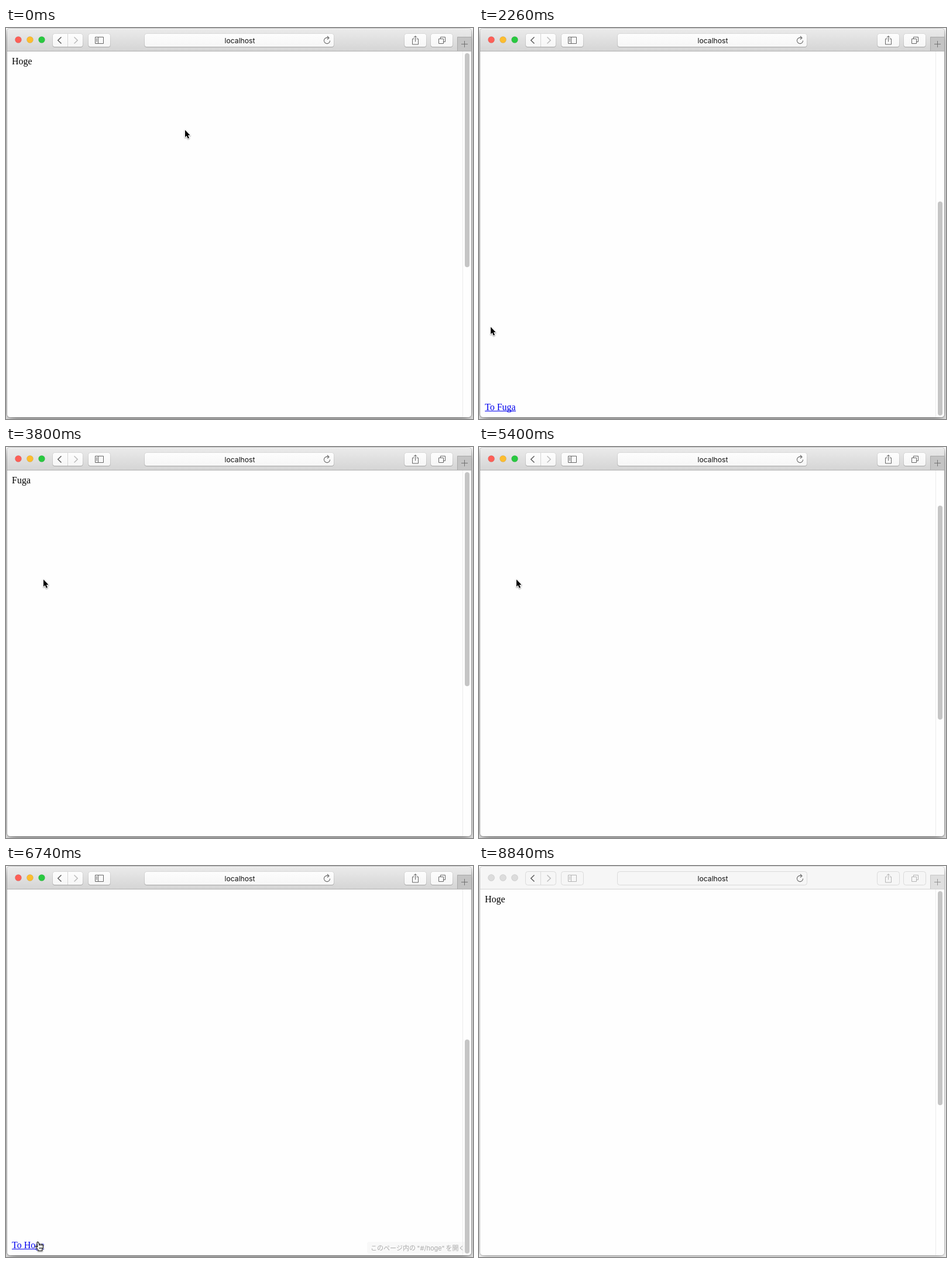
Recreate the animation shown at these times as an HTML page with a canvas. Size 798x667 px, loop 8.89 s.

```html
<!DOCTYPE html>
<html lang="ja">
<head>
<meta charset="utf-8">
<title>localhost</title>
<style>
html, body { margin: 0; width: 100%; height: 100%; overflow: hidden; background: #fff; }
canvas { display: block; width: 798px; height: 667px; }
</style>
</head>
<body>
<canvas id="stage" width="798" height="667"></canvas>
<script>
const ctx = document.getElementById('stage').getContext('2d');
const LOOP = 8890, BLUR = 8840, FADE = 160;
const VIEW = 624, THUMB = 365, TRAVEL = 253;
const MAX_SCROLL = VIEW * TRAVEL / THUMB;
const UI = 'Inter, Roboto, sans-serif';
const CJK = '"Noto Sans CJK JP", "Noto Sans CJK", sans-serif';
const SERIF = '16px "Liberation Serif", Times, serif';

// Each glide: start time, end time, destination
const scrolls = {
  Hoge: [[860, 1130, 43], [1310, 1660, 210], [1810, 1890, TRAVEL]],
  Fuga: [[4720, 4810, 12], [5170, 5220, 33], [5400, 5400, 57], [5670, 6000, TRAVEL]]
};
const moves = [
  [2100, 2260, 20, 510],
  [2320, 2560, 40, 643],
  [3400, 3800, 64, 226],
  [6080, 6550, 55, 641],
  [7440, 7780, 457, 625],
  [7810, 7870, 743, 598],
  [8080, 8420, 771, 669]
];
const hovers = [
  { hash: '#/fuga', from: 2560, click: 2990, show: 2680, hide: 3400 },
  { hash: '#/hoge', from: 6550, click: 7050, show: 6690, hide: 7440 }
];

const clamp = v => Math.min(1, Math.max(0, v));
const ease = p => p * p * (3 - 2 * p);

function glide(list, t, start) {
  let pos = start;
  for (const [t0, t1, ...to] of list) {
    if (t < t0) break;
    const p = t1 > t0 ? ease(clamp((t - t0) / (t1 - t0))) : 1;
    pos = pos.map((v, i) => v + (to[i] - v) * p);
  }
  return pos.map(Math.round);
}

function rounded(x, y, w, h, r, fill, stroke) {
  ctx.beginPath();
  ctx.roundRect(x, y, w, h, r);
  paint(fill, stroke);
}

function circle(x, y, r, fill, stroke) {
  ctx.beginPath();
  ctx.arc(x, y, r, 0, 7);
  paint(fill, stroke);
}

function paint(fill, stroke) {
  if (fill) {
    ctx.fillStyle = fill;
    ctx.fill();
  }
  if (stroke) {
    ctx.strokeStyle = stroke;
    ctx.lineWidth = 1;
    ctx.stroke();
  }
}

function rect(color, x, y, w, h) {
  ctx.fillStyle = color;
  ctx.fillRect(x, y, w, h);
}

function icon(color, path, width = 1) {
  ctx.strokeStyle = color;
  ctx.lineWidth = width;
  ctx.stroke(new Path2D(path));
}

function text(str, x, y, font, color, align = 'left') {
  ctx.font = font;
  ctx.fillStyle = color;
  ctx.textAlign = align;
  ctx.fillText(str, x, y);
}

function gradient(y0, y1, top, bottom) {
  const g = ctx.createLinearGradient(0, y0, 0, y1);
  g.addColorStop(0, top);
  g.addColorStop(1, bottom);
  return g;
}

function button(x, w, active) {
  if (!active) return rounded(x - 0.5, 9.5, w + 1, 23, 4, null, '#dadada');
  rounded(x - 0.5, 9.5, w + 1, 23.5, 4, gradient(9, 33, 'rgba(0,0,0,.1)', 'rgba(0,0,0,.24)'));
  rounded(x, 10, w, 22, 3.5, gradient(10, 32, '#fdfdfd', '#f6f6f6'));
}

function windowFrame(active) {
  rect('#fff', 0, 0, 798, 667);
  ctx.save();
  ctx.shadowColor = `rgba(0,0,0,${active ? 0.52 : 0.32})`;
  ctx.shadowBlur = active ? 18 : 12;
  ctx.shadowOffsetY = active ? 7 : 4;
  rounded(2, 1, 793, 663, 5, '#fefefe');
  ctx.restore();
  rounded(1.5, 0.5, 794, 664, 5, null, `rgba(0,0,0,${active ? 0.18 : 0.12})`);
}

function toolbar(active) {
  const ink = active ? '#666' : '#b4b4b4';
  rounded(2, 1, 793, 39, [5, 5, 0, 0], active ? gradient(1, 39, '#ebebeb', '#d5d5d5') : '#f6f6f6');
  rect(active ? '#f6f6f6' : '#fbfbfb', 6, 1, 785, 1);
  rect(active ? '#b0b0b0' : '#d3d3d3', 2, 39, 793, 1);

  ['#fd5f57', '#fdbd2f', '#29c940'].forEach((color, i) =>
    circle(21 + 20 * i, 20, 5.5, active ? color : '#dcdcdc', 'rgba(0,0,0,.09)'));

  for (const [x, w] of [[80, 51], [141, 37], [237, 323], [681, 37], [726, 37]]) button(x, w, active);
  rect(active ? '#d4d4d4' : '#dadada', 105, 10, 1, 22);

  icon('#5e5e5e', 'M94.5 15.5L88.8 21L94.5 26.5', 1.5);
  icon('#bababa', 'M116.5 15.5L122.2 21L116.5 26.5', 1.5);
  icon(ink, 'M152.5 15.5h14v11h-14zM157.5 15v12M154 18.5h2M154 20.5h2M154 22.5h2');
  icon('#666', 'M553.6 21.5A5.1 5.1 0 1 1 550.5 16.8M549 14L552 17L549 19.5', 1.1);
  icon(ink, 'M697.5 18.5h-3v9.5h10v-9.5h-3M699.5 14v9.5M696.5 16.5l3 -3l3 3');
  icon(ink, 'M739.5 18.5h8v8h-8zM742.5 18v-2.5h8v8h-2.5');
  text('localhost', 399.5, 26, '12.2px ' + UI, '#111', 'center');

  rect(active ? '#c4c4c4' : '#dfdfdf', 771, 15, 24, 24);
  icon(active ? '#a9a9a9' : '#c8c8c8', 'M771.5 39V15.5H795');
  icon(active ? '#737373' : '#959595', 'M778 27.5h11M783.5 22v11');
}

function page(name, other, scroll) {
  const label = 'To ' + other, y = 652 + MAX_SCROLL - scroll;
  ctx.save();
  ctx.beginPath();
  ctx.rect(2, 40, 778, VIEW);
  ctx.clip();
  text(name, 10, 62 - scroll, SERIF, '#000');
  text(label, 10, y, SERIF, '#0000ee');
  rect('#0000ee', 10, y + 1, Math.round(ctx.measureText(label).width), 1);
  ctx.restore();
}

function tooltip({ hash, show, hide }, t) {
  ctx.save();
  ctx.globalAlpha = clamp((t - show) / FADE) * clamp(1 - (t - hide) / FADE);
  const font = '11px ' + CJK, latin = '11px ' + UI;
  ctx.font = latin;
  const quoted = `"${hash}"`;
  const x = 734 - Math.round(ctx.measureText(quoted).width / 2) - 93;
  rounded(x, 641, 792 - x, 20, 4, '#eaeaea');
  text('このページ内の', x + 6, 655.5, font, '#000');
  text(quoted, (x + 835) / 2, 655.5, latin, '#000', 'center');
  text('を開く', 751.5, 655.5, font, '#000');
  ctx.restore();
}

function scrollbar(offset) {
  rect('#ebebeb', 780, 40, 1, VIEW);
  rounded(784, 43 + offset, 8, THUMB, 4, '#c5c5c5');
}

const arrow = new Path2D('M0 0V12.2L2.7 9.7L4.8 14.4L7 13.5L4.9 8.9H8.6Z');
const hand = new Path2D('M-2 1.2Q-1 -.4 .4 .8L1.8 5Q2.6 3.4 4 4.4Q5.2 3.4 6.4 4.9Q7.6 4.2 8.3 5.8' +
  'L8.4 9.8L6.8 13V15.5H-.2V13.5L-4 9Q-4.8 7.4 -3.3 7.2L-1.2 9Z');

function pointer([x, y], overLink) {
  const shape = overLink ? hand : arrow;
  ctx.save();
  ctx.translate(x, y);
  ctx.lineJoin = 'round';
  ctx.shadowColor = 'rgba(0,0,0,.4)';
  ctx.shadowBlur = 2;
  ctx.shadowOffsetY = 1;
  ctx.strokeStyle = '#fff';
  ctx.lineWidth = 2;
  ctx.stroke(shape);
  ctx.shadowColor = 'transparent';
  ctx.fillStyle = overLink ? '#fff' : '#000';
  ctx.fill(shape);
  if (overLink) {
    ctx.strokeStyle = '#000';
    ctx.lineWidth = 1.1;
    ctx.stroke(hand);
    icon('#000', 'M2.2 9.5v3M4.2 9.5v3M6.1 9.5v3M1.8 4.5v2.5M4.1 5v2M6.3 5.2v2', 0.9);
  }
  ctx.restore();
}

function draw(t) {
  const active = t < BLUR;
  const onFuga = t >= hovers[0].click && t < hovers[1].click;
  const [name, other] = onFuga ? ['Fuga', 'Hoge'] : ['Hoge', 'Fuga'];
  const [thumb] = t < hovers[1].click ? glide(scrolls[name], t, [0]) : [0];
  const overLink = hovers.some(h => t >= h.from && t < h.click + 60);

  windowFrame(active);
  page(name, other, thumb / TRAVEL * MAX_SCROLL);
  for (const h of hovers) tooltip(h, t);
  scrollbar(thumb);
  toolbar(active);
  if (active) pointer(glide(moves, t, [306, 174]), overLink);
}

function tick() {
  draw(performance.now() % LOOP);
  requestAnimationFrame(tick);
}
tick();
</script>
</body>
</html>
```
